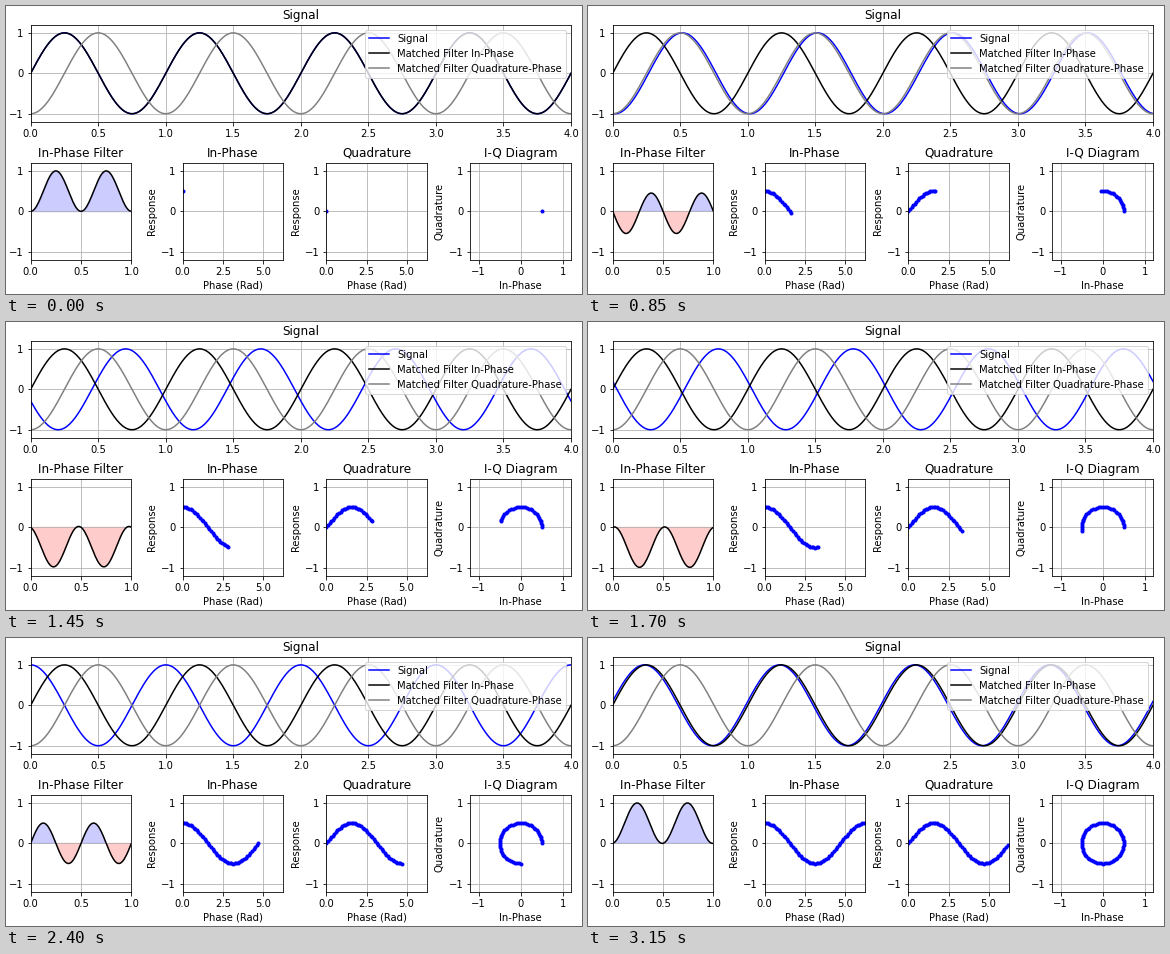
Recreate the animation shown at these times as a matplotlib script. Size 576 by 288 pixels, loop 3.2 s.

```python
import numpy as np
import matplotlib.pyplot as plt
from matplotlib.animation import FuncAnimation

W, H, DPI = 576, 288, 72
FRAMES, INTERVAL = 64, 50

plt.rcParams.update({"font.family": "DejaVu Sans", "font.size": 10})
fig = plt.figure(figsize=(W / DPI, H / DPI), dpi=DPI, facecolor="white")


def panel(left, top, title, xlim, xticks, xlabel="", ylabel="", width=100.7):
    """Add a gridded axes; left, top and width are in pixels."""
    height = 97
    ax = fig.add_axes([left / W, 1 - (top + height) / H,
                       width / W, height / H])
    ax.set(title=title, xlim=xlim, ylim=(-1.2, 1.2), xticks=xticks,
           yticks=[-1, 0, 1], xlabel=xlabel, ylabel=ylabel)
    ax.grid(True)
    return ax


TOP, LOW = 18.8, 156.8
TURN = 2 * np.pi
phase_args = ((0, TURN), [0, 2.5, 5], "Phase (Rad)", "Response")

ax_signal = panel(24.7, TOP, "Signal", (0, 4), np.arange(0, 4.5, 0.5),
                  width=540.3)
ax_filter = panel(24.7, LOW, "In-Phase Filter", (0, 1), [0, 0.5, 1])
ax_in = panel(176.7, LOW, "In-Phase", *phase_args)
ax_quad = panel(320.45, LOW, "Quadrature", *phase_args)
ax_iq = panel(464.3, LOW, "I-Q Diagram", (-1.2, 1.2), [-1, 0, 1],
              "In-Phase", "Quadrature")

t = np.linspace(0, 4, 401)
in_phase = np.sin(TURN * t)
quadrature = -np.cos(TURN * t)

signal_line, = ax_signal.plot(t, in_phase, "b", label="Signal")
ax_signal.plot(t, in_phase, "k", label="Matched Filter In-Phase")
ax_signal.plot(t, quadrature, "gray", label="Matched Filter Quadrature-Phase")
ax_signal.legend(loc="upper right")

filter_line, = ax_filter.plot([], [], "k")
in_dots, = ax_in.plot([], [], "b.")
quad_dots, = ax_quad.plot([], [], "b.")
iq_dots, = ax_iq.plot([], [], "b.")
fills = []


def update(i):
    phases = TURN * np.arange(i + 1) / FRAMES
    signal = np.sin(TURN * t - phases[-1])
    product = signal * in_phase
    signal_line.set_ydata(signal)
    filter_line.set_data(t, product)

    while fills:
        fills.pop().remove()
    for mask, color in ((product > 0, "blue"), (product < 0, "red")):
        fills.append(ax_filter.fill_between(t, product, where=mask,
                                            color=color, alpha=0.2))

    i_out, q_out = 0.5 * np.cos(phases), 0.5 * np.sin(phases)
    in_dots.set_data(phases, i_out)
    quad_dots.set_data(phases, q_out)
    iq_dots.set_data(i_out, q_out)
    return [signal_line, filter_line, in_dots, quad_dots, iq_dots, *fills]


anim = FuncAnimation(fig, update, frames=FRAMES, interval=INTERVAL,
                     init_func=lambda: update(0), repeat=True)
plt.show()
```
